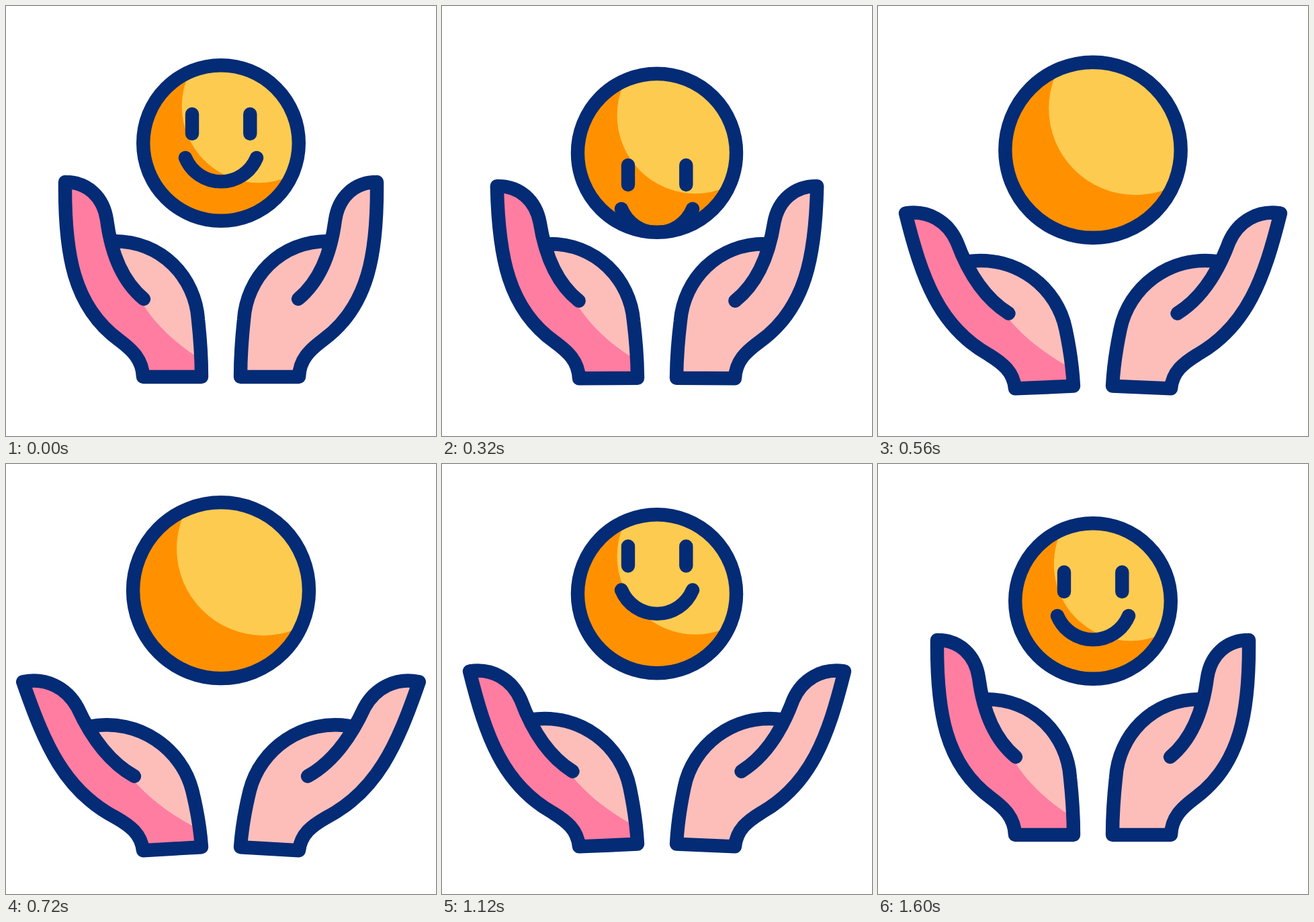
Animation, 640 px wide and 640 px high, one loop 1720 ms. Source, as an HTML page:

```html
<!DOCTYPE html>
<html lang="en">
<head>
<meta charset="utf-8">
<title>Caring hands</title>
<style>
  html, body { margin: 0; width: 100%; height: 100%; overflow: hidden; background: #fff; }
  svg { display: block; width: 100%; height: 100%; }
  .line { fill: none; stroke: #042b75; stroke-width: 20.4; stroke-linecap: round; stroke-linejoin: round; }
</style>
</head>
<body>
<svg viewBox="0 0 640 640">
  <defs><clipPath id="clip"><circle class="disc"/></clipPath></defs>
  <g class="hand">
    <path class="skin" fill="#ff7da1"/>
    <path class="palm" fill="#fdbeba"/>
    <path class="line"/>
  </g>
  <g class="hand" transform="matrix(-1 0 0 1 640 0)">
    <path class="skin" fill="#fdbeba"/>
    <path class="palm" fill="#fdbeba"/>
    <path class="line"/>
  </g>
  <g clip-path="url(#clip)">
    <circle class="disc" fill="#ff9100"/>
    <circle id="glow" fill="#fdcb50"/>
    <path id="face" class="line" d="M277 161V190M363.3 161V190M267 226A57.4 57.4 0 0 0 373 226"/>
  </g>
  <circle class="disc line"/>
</svg>
<script>
const LOOP = 1720, STEP = 40, LAST = 1600;

// Upright left hand as Bezier key points; bend() gives every other pose.
const OUTER = [[88, 262], [87, 368], [100, 447], [168, 497], [188, 512], [203, 526], [204, 552]];
const BACK = [[158, 350], [234, 349], [282, 406], [286, 467], [289, 495], [291, 530], [291, 552]];
const TIP = [[88, 262], [122, 262], [145, 285], [150, 318]];
const CREASE = [[150, 318], [157, 372], [176, 412], [205, 436]];
const SHADE = [[200, 437], [215, 465], [245, 497], [284, 522]];

const all = s => [...document.querySelectorAll(s)];
const set = (s, attrs) => all(s).forEach(el => {
  for (const k in attrs) el.setAttribute(k, attrs[k]);
});
const clamp = u => Math.max(0, Math.min(1, u));
const smooth = u => u * u * (3 - 2 * u);
const cubic = u => u < .5 ? 4 * u ** 3 : 1 - 4 * (1 - u) ** 3;
const move = (t, t0, t1, a, b) => a + (b - a) * smooth(clamp((t - t0) / (t1 - t0)));
// Rises to 1 and back, symmetric about the time mid.
const swell = (t, mid, reach, rise) => cubic(clamp((reach - Math.abs(t - mid)) / rise));

// Sinks the hand and turns each point about the wrist, more with height.
function bend([x, y], u) {
  const w = 291 - x, h = 552 - y, turn = u * (.06 + .00057 * h);
  return [x - turn * h, y + turn * w + 19 * u];
}

function drawHands(u) {
  const shape = pts => pts.map(p => bend(p, u).map(v => v.toFixed(2)));
  const run = (pts, cmd = 'L') => {
    const [first, ...rest] = shape(pts);
    return cmd + first + 'C' + rest.join(' ');
  };
  const back = pts => run([...pts].reverse());
  set('.skin', { d: run(OUTER, 'M') + back(BACK) + back(TIP) + 'Z' });
  set('.palm', { d: run(BACK.slice(0, 4), 'M') + back(SHADE) + back(CREASE) + 'Z' });
  set('.hand .line', { d: run(OUTER, 'M') + back(BACK) + run(TIP, 'M') + run(CREASE) });
}

function ballY(t) {
  if (t < 420) return move(t, 160, 420, 204, 226);
  if (t < 880) return move(t, 420, 880, 226, 173.5);
  return move(t, 880, 1280, 173.5, 204);
}

// The face drops out below, then rolls in from above.
const faceY = t => t < 640
  ? 76 * (t / 320) ** 2.4
  : -170 * (Math.max(0, 1400 - t) / 520) ** 2.4;

function draw(t) {
  drawHands(swell(t, 840, 750, 800));
  const y = ballY(t), k = 1 + .131 * swell(t, 720, 560, 480);
  set('.disc', { cx: 320, cy: y, r: 115.8 * k });
  set('#glow', { cx: 320 + 56 * k, cy: y - 55 * k, r: 114.3 * k });
  set('#face', { transform: `translate(0 ${faceY(t)})` });
}

const start = performance.now();
function tick() {
  const t = (performance.now() - start) % LOOP;
  draw(Math.min(LAST, Math.floor(t / STEP) * STEP));
  requestAnimationFrame(tick);
}
tick();
</script>
</body>
</html>
```
